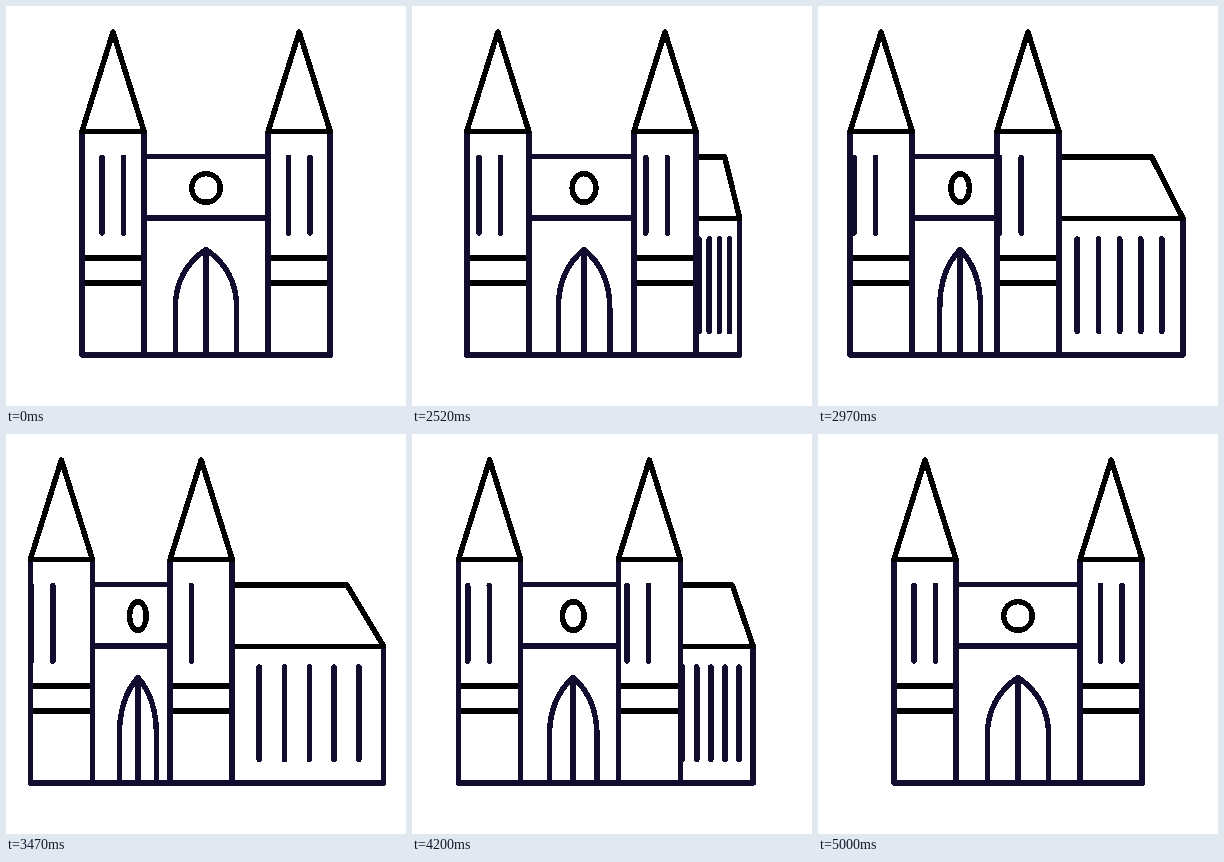
Recreate the animation shown at these times as an HTML page. Size 400 by 400 pixels, loop 5.02 s.

```html
<!DOCTYPE html>
<html lang="en">
<head>
<meta charset="utf-8">
<title>Turning cathedral</title>
<style>
  html, body { margin: 0; width: 100%; height: 100%; overflow: hidden; background: #fff; }
  svg {
    display: block; width: 400px; height: 400px;
    fill: none; stroke-width: 5.5; stroke-linecap: round; stroke-linejoin: round;
    shape-rendering: crispEdges;
  }
  .navy { stroke: #100d2e; }
  .black { stroke: #000; }
  .wall { fill: #fff; }
</style>
</head>
<body>
<svg id="stage" viewBox="0 0 400 400"></svg>
<script>
const stage = document.getElementById('stage');
const LOOP = 5020, START = 2000, PEAK = 3500, END = 5000;
const MAX_TURN = 51.6; // how far the left wall travels, in px

// Cubic bezier easing whose handles are (x1, 0) and (x2, 1)
const ease = (x1, x2) => x => {
  let lo = 0, hi = 1;
  for (let i = 0; i < 30; i++) {
    const u = (lo + hi) / 2, v = 1 - u;
    if (3 * u * v * v * x1 + 3 * u * u * v * x2 + u * u * u < x) lo = u;
    else hi = u;
  }
  return lo * lo * (3 - 2 * lo);
};
const turnOut = ease(0.304, 0.419);
const turnBack = ease(0.58, 0.41);

function turnAt(t) {
  if (t <= START || t >= END) return 0;
  return MAX_TURN * (t < PEAK
    ? turnOut((t - START) / (PEAK - START))
    : 1 - turnBack((t - PEAK) / (END - PEAK)));
}

const line = (color, d) => `<path class="${color}" d="${d}"/>`;
const wall = (x, y, w) =>
  `<rect class="wall" x="${x}" y="${y}" width="${w}" height="${349 - y}"/>`;

function tower(x, windowX) {
  const r = x + 62;
  return wall(x, 125, 62)
    + line('black', `M${x} 252H${r}M${x} 277H${r}`)
    + line('navy', `M${x} 125V349H${r}V125`)
    + line('navy', `M${windowX} 151.5V227M${windowX + 21.5} 151.5V227`)
    + line('black', `M${x} 125.3L${x + 31} 26L${r} 125.3Z`);
}

function nave(m, towerMid) {
  const right = 293 + 1.64 * m;
  const windows = [-0.773, -0.28, 0.2, 0.68, 1.16]
    .map(k => `M${293 + k * m} 233V325.5`).join('');
  return line('navy', `M${towerMid} 212V349H${right}V212` + windows)
    + line('black', `M${towerMid} 151H${293 + 0.93 * m}L${right} 212.3H${towerMid}`);
}

function front(m, left, right) {
  const mid = 200 - 1.32 * m, half = 30.7 - 0.235 * m;
  const arch = s => {
    const x = mid + s * half;
    return `M${x} 349V302C${x} 275 ${mid + s * half * 0.6} 256 ${mid} 243.5`;
  };
  return wall(left, 150, right - left)
    + line('navy', `M${left} 150.3H${right}M${left} 212H${right}M${left} 349H${right}`)
    + line('navy', arch(-1) + arch(1) + `M${mid} 243.5V349`)
    + `<ellipse class="black" cx="${mid}" cy="182" rx="${14.3 - 0.115 * m}" ry="14.3"/>`;
}

function draw(m) {
  const left = 76 - m, right = 262.2 - 1.9 * m;
  stage.innerHTML = nave(m, right + 31)
    + front(m, left + 62, right)
    + tower(left, 96 - 1.37 * m)
    + tower(right, 282.5 - 2.3 * m);
}

const begin = performance.now();
function tick() {
  draw(turnAt((performance.now() - begin) % LOOP));
  requestAnimationFrame(tick);
}
tick();
</script>
</body>
</html>
```
